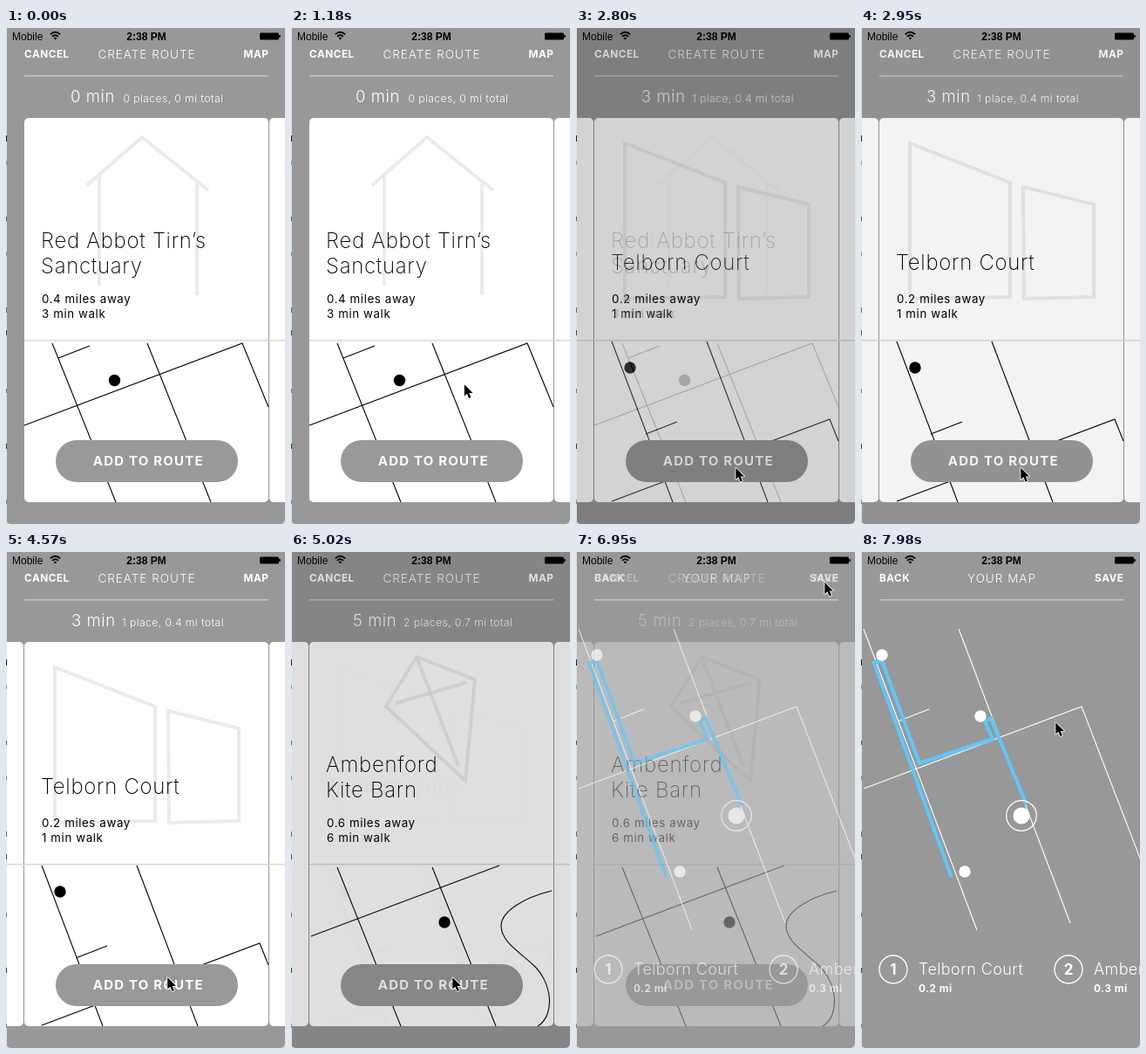
An HTML page for the animation above (8000 ms loop, 320 by 568 pixels).

```html
<!DOCTYPE html>
<html lang="en">
<head>
<meta charset="utf-8">
<title>Create route</title>
<style>
  html, body { margin: 0; width: 100%; height: 100%; overflow: hidden; background: #989898; }
  svg { display: block; width: 320px; height: 568px; }
  text { font-family: Inter, "Open Sans", sans-serif; white-space: pre; }
  .status { font-family: "Liberation Sans", sans-serif; font-size: 12px; }
  .bold { font-weight: 700; font-size: 11.8px; letter-spacing: .5px; fill: #fff; }
  .head { font-weight: 300; font-size: 13.5px; letter-spacing: 1px; fill: #fff; }
  .time { font-weight: 300; font-size: 18.5px; letter-spacing: .6px; fill: #fff; }
  .total { font-weight: 300; font-size: 12.2px; letter-spacing: .4px; fill: #fff; }
  .name { font-weight: 250; font-size: 24px; letter-spacing: .7px; }
  .info { font-weight: 370; font-size: 13.3px; letter-spacing: .6px; }
  .add { font-weight: 700; font-size: 15px; letter-spacing: 1.2px; fill: #fff; }
  .stop { font-weight: 300; font-size: 18px; letter-spacing: .4px; fill: #fff; }
  .num { font-weight: 700; font-size: 17px; fill: #fff; }
  .icon { fill: none; stroke: #ebebeb; stroke-width: 4; }
  .street { fill: none; stroke: #000; stroke-width: 1.1; }
  .road { fill: none; stroke: #fff; stroke-width: 1.1; }
</style>
</head>
<body>
<svg id="stage" viewBox="0 0 320 568"></svg>
<script>
const LOOP = 8000, TICK = 147.6;

const text = (cls, x, y, str, anchor = 'start') =>
  `<text class="${cls}" x="${x}" y="${y}" text-anchor="${anchor}">${str}</text>`;
const path = (cls, d) => `<path class="${cls}" d="${d}"/>`;
const rect = (x, y, w, h, fill, r = 0) =>
  `<rect x="${x}" y="${y}" width="${w}" height="${h}" rx="${r}" fill="${fill}"/>`;
const dot = (x, y, r, fill) => `<circle cx="${x}" cy="${y}" r="${r}" fill="${fill}"/>`;
const ring = (x, y, r, w) =>
  `<circle cx="${x}" cy="${y}" r="${r}" fill="none" stroke="#fff" stroke-width="${w}"/>`;
const group = (id, body) => `<g id="${id}">${body}</g>`;

const places = [
  {
    name: ['Red Abbot Tirn’s', 'Sanctuary'], away: '0.4', walk: 3,
    time: [74, '0 min'], total: [134.5, '0 places, 0 mi total'],
    icon: 'M93 180L156 125L232 186M107 168V295M219 178V306', ruleX: 21,
    map: 'M53 361L126 543M60 378L96 364M162 361L235 543M21 455L271 361L301 434',
    pin: [124.5, 403.5]
  },
  {
    name: ['Telborn Court'], away: '0.2', walk: 1,
    time: [75, '3 min'], total: [133, '1 place, 0.4 mi total'],
    icon: 'M56 132L171 177V308L56 310ZM186 182L267 202V308L187 310Z', ruleX: 1,
    map: 'M41 359L111 543M150 359L220 543M80 465L116 451M41 542L291 448L301 473',
    pin: [62, 389]
  },
  {
    name: ['Ambenford', 'Kite Barn'], away: '0.6', walk: 6,
    time: [71, '5 min'], total: [129, '2 places, 0.7 mi total'],
    icon: 'M144 120L211 146L200 262L109 177ZM144 120L192 245M120 173L201 149.5', ruleX: 21,
    map: 'M53 361L126 543M162 361L235 543M23 440L239 359' +
      'M299 388C266 396 241 412 241 428C241 446 262 458 278 473C299 492 304 530 283 543',
    pin: [176, 424]
  }
];

function card(p, i) {
  const top = p.name.length > 1 ? 252 : 277;
  return group('card' + i,
    (i ? rect(-30, 103, 50, 440, '#fff', 5) : '') +
    rect(21, 103, 280, 440, '#fff', 5) +
    rect(302, 103, 40, 440, '#fff', 5) +
    path('icon', p.icon) +
    rect(p.ruleX, 357, 320, 1.5, '#d9d9d9') +
    p.name.map((s, n) => text('name', 40, top + 29 * n, s)).join('') +
    text('info', 41, 315, p.away + ' miles away') +
    text('info', 41, 332, p.walk + ' min walk') +
    path('street', p.map) + dot(...p.pin, 6.7, '#000'));
}

const summary = (p, i) => group('sum' + i,
  text('time', p.time[0], 85, p.time[1]) + text('total', p.total[0], 85, p.total[1]));

const button = rect(57, 472, 209, 48, '#999', 24) + text('add', 163.3, 501, 'ADD TO ROUTE', 'middle');

const header = (left, title, right) =>
  text('bold', 21, 34, left) + text('head', 161.5, 34.7, title, 'middle') + text('bold', 301.5, 34, right, 'end');

const stop = (x, n, name, miles) =>
  ring(x, 478, 16, 1.3) + text('num', x, 484, n, 'middle') +
  text('stop', x + 29, 484, name) + text('bold', x + 29, 504, miles + ' mi');

const mapView =
  header('BACK', 'YOUR MAP', 'SAVE') +
  path('road', 'M3 88L133 433M112 88L240 425M3 271L253 177L321 353M42 194L78 180') +
  '<path d="M104 373L15 127L24 124L67 242L151 214L142 194L149 190L190 290" fill="none" stroke="#5cc8fc" stroke-width="4"/>' +
  [[24, 118], [137, 188], [119, 366]].map(c => dot(...c, 6.7, '#fff')).join('') +
  dot(184, 302, 9.5, '#fff') + ring(184, 302, 17.3, 1.2) +
  stop(37, 1, places[1].name[0], '0.2') + stop(238, 2, places[2].name.join(' '), '0.3');

const statusBar =
  text('status', 7, 13.5, 'Mobile') +
  '<g fill="none" stroke="#000" stroke-width="1.8"><path d="M50.8 7.4Q56.5 2.2 62.2 7.4M53 9.8Q56.5 6.7 60 9.8"/></g>' +
  path('', 'M54.6 11.5Q56.5 9.8 58.4 11.5L56.5 13.6Z') +
  `<g font-weight="700">${text('status', 161, 13.5, '2:38 PM', 'middle')}</g>` +
  rect(291, 5.5, 22, 8, '#000', 1.5) + rect(313, 8, 1.8, 3, '#000', .8);

// Sliver of desktop showing beside the phone window
const edge = rect(0, 0, 1, 568, '#e4e4e4') +
  [[123, 7, '#123'], [152, 5, '#69a9c9'], [216, 5, '#275'], [256, 5, '#69b'], [320, 6, '#387'],
   [346, 6, '#164'], [413, 5, '#777'], [476, 6, '#152'], [540, 5, '#4a8']]
    .map(([y, h, c]) => rect(0, y, 1, h, c)).join('') +
  '<path d="M0 563Q1 568 6 568H0ZM320 563Q319 568 314 568H320Z" fill="#ddd"/>';

document.getElementById('stage').innerHTML =
  rect(0, 0, 320, 568, '#989898') +
  group('create', header('CANCEL', 'CREATE ROUTE', 'MAP') +
    places.map(summary).join('') +
    // later cards sit underneath so the earlier one can fade away
    places.map(card).reverse().join('') + button) +
  group('map', mapView) +
  rect(21, 54, 280, 1.6, '#c4c4c4') + statusBar +
  group('dim', rect(0, 0, 320, 568, '#000')) + edge +
  group('cursor', '<path d="M.8 1.2V14.6L3.9 11.8L6.1 16.9L8.4 15.9L6.2 10.9H10.5Z" stroke="#fff" stroke-width="1.6" stroke-linejoin="round" paint-order="stroke"/>');

const el = id => document.getElementById(id);
const fade = (id, a) => {
  el(id).setAttribute('opacity', a);
  el(id).style.display = a > 0 ? '' : 'none';
};
const clamp = v => Math.max(0, Math.min(1, v));

// Pointer stops: tick, x, y
const trail = [
  [4, 250, 343], [8, 198, 407], [9, 198, 407], [16, 182.5, 502.5], [20, 182.5, 502.5],
  [23, 192, 362], [25, 192, 362], [30, 184, 489], [31, 184.5, 486], [36, 184.5, 486],
  [43, 284.5, 33.5], [50, 284.5, 33.5], [54, 222.5, 194]
];

function pointer(tick) {
  const i = trail.findIndex(k => k[0] >= tick);
  if (i < 0) return trail[trail.length - 1].slice(1);
  if (i === 0) return trail[0].slice(1);
  const [a, b] = [trail[i - 1], trail[i]];
  const u = (tick - a[0]) / (b[0] - a[0]), e = u * u * (3 - 2 * u);
  return [a[1] + (b[1] - a[1]) * e, a[2] + (b[2] - a[2]) * e];
}

// Dark flash after a tap, falling by an eighth each tick
const flash = (tick, start, peak) => tick < start ? 0 : Math.max(0, peak - .125 * (tick - start));

function draw(ms) {
  const tick = Math.floor((ms + 15) / TICK);
  const page = tick < 19 ? 0 : tick < 34 ? 1 : 2;
  const dim = Math.max(flash(tick, 19, .172), flash(tick, 34, .125));
  const ghost = clamp((dim - .12) * 4);

  places.forEach((p, i) => {
    const a = i === page ? 1 : i === page - 1 ? ghost : 0;
    fade('card' + i, a);
    fade('sum' + i, i === page ? 1 - ghost : a);
  });
  const mapShown = clamp((tick - 45) / 3);
  fade('create', 1 - mapShown);
  fade('map', mapShown);
  fade('dim', dim);
  fade('cursor', tick < 4 ? 0 : 1);
  el('cursor').setAttribute('transform', `translate(${pointer(tick)})`);
}

function frame() {
  draw(performance.now() % LOOP);
  requestAnimationFrame(frame);
}
frame();
</script>
</body>
</html>
```
